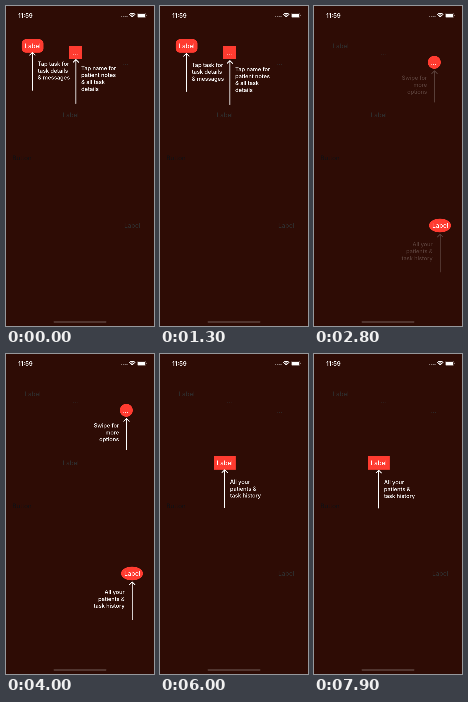
Animation, 148 px wide and 320 px high, one loop 8 s. Source, as an HTML page with a canvas:

```html
<!DOCTYPE html>
<html lang="en">
<head>
<meta charset="utf-8">
<title>Spotlight tour</title>
<style>
  html, body { margin: 0; width: 100%; height: 100%; overflow: hidden; background: #2e0c05; }
  canvas { display: block; width: 148px; height: 320px; }
</style>
</head>
<body>
<canvas id="stage"></canvas>
<script>
const W = 148, H = 320, LOOP = 8000;
const FONT = 'Inter, "Liberation Sans", sans-serif';
const RED = '#ff3b30', DIM_RED = '#ff431c';
const BOB = 2, BOB_HALF = 800, FADE_IN = 500, FADE_OUT = 300, LINE = 6.9;

// Oversampled so that small type keeps its proportions.
const scale = 4 * (window.devicePixelRatio || 1);
const canvas = document.getElementById('stage');
const ctx = canvas.getContext('2d');
canvas.width = W * scale;
canvas.height = H * scale;

// Holes trace a path; tips are placed at the lowest point of the bob.
const rect = (x, y, w, h, r = 0) => () => ctx.roundRect(x, y, w, h, r);
const oval = (x, y, rx, ry) => () => ctx.ellipse(x, y, rx, ry, 0, 0, Math.PI * 2);

const steps = [
  {
    start: -2100, end: 2350,
    holes: [rect(15.7, 33.2, 21.8, 13.5, 4.4), rect(63, 40, 13, 13)],
    tips: [
      { x: 26.4, top: 47.8, bottom: 85.6, tx: 31.8, ty: 59.2, lines: ['Tap task for', 'task details', '& messages'] },
      { x: 69.9, top: 54.9, bottom: 98.9, tx: 75.2, ty: 63.6, lines: ['Tap name for', 'patient notes', '& all task', 'details'] }
    ]
  },
  {
    start: 2650, end: 4950,
    holes: [oval(120.3, 56.3, 6.5, 6.5), oval(126, 219.5, 11, 6.9)],
    tips: [
      { x: 120.5, top: 65, bottom: 96.2, tx: 113, ty: 72, align: 'right', lines: ['Swipe for', 'more', 'options'] },
      { x: 126.2, top: 228.4, bottom: 266.2, tx: 118.6, ty: 238.5, align: 'right', lines: ['All your', 'patients &', 'task history'] }
    ]
  },
  {
    start: 5250, end: LOOP,
    holes: [rect(53.9, 102.2, 21.8, 13.5)],
    tips: [
      { x: 64.7, top: 117.8, bottom: 155.6, tx: 70, ty: 129.8, lines: ['All your', 'patients &', 'task history'] }
    ]
  }
];

const clamp = v => Math.min(1, Math.max(0, v));
const ease = v => (1 - Math.cos(Math.PI * clamp(v))) / 2;

function text(str, x, y, size, weight = 400, align = 'left') {
  ctx.font = `${weight} ${size}px ${FONT}`;
  ctx.textAlign = align;
  ctx.textBaseline = 'alphabetic';
  ctx.fillText(str, x, y + size * 0.36);
}

function page(background) {
  ctx.fillStyle = background;
  ctx.fillRect(0, 0, W, H);
  const label = (str, x, y) => text(str, x, y, 6.25, 400, 'center');
  ctx.fillStyle = '#fff';
  label('Label', 26.6, 40);
  label('Label', 64.7, 109);
  label('Label', 126.2, 219.6);
  label('...', 69.4, 47);
  label('...', 119.6, 56.6);
  ctx.fillStyle = '#40607a';
  label('Button', 16, 152);
}

function spotlight(holes, alpha) {
  ctx.save();
  ctx.beginPath();
  for (const hole of holes) {
    ctx.closePath();
    hole();
  }
  ctx.clip();
  ctx.globalAlpha = alpha;
  page(RED);
  ctx.restore();
}

function tooltip(tip, dy, alpha) {
  ctx.save();
  ctx.globalAlpha = alpha;
  ctx.translate(0, dy);
  ctx.strokeStyle = ctx.fillStyle = '#fff';
  ctx.lineWidth = 0.9;
  ctx.lineCap = ctx.lineJoin = 'round';
  ctx.beginPath();
  ctx.moveTo(tip.x, tip.bottom);
  ctx.lineTo(tip.x, tip.top);
  ctx.moveTo(tip.x - 2.7, tip.top + 2.7);
  ctx.lineTo(tip.x, tip.top);
  ctx.lineTo(tip.x + 2.7, tip.top + 2.7);
  ctx.stroke();
  tip.lines.forEach((line, i) => text(line, tip.tx, tip.ty + i * LINE, 5.55, 500, tip.align));
  ctx.restore();
}

function statusBar() {
  ctx.fillStyle = ctx.strokeStyle = '#fff';
  text('11:59', 12.2, 9.6, 6, 600);

  ctx.globalAlpha = 0.45;
  for (let i = 0; i < 4; i++) ctx.fillRect(115 + i * 1.8, 10, 1.2, 1.2);
  ctx.globalAlpha = 1;

  ctx.lineWidth = 0.9;
  for (const r of [1.2, 2.7, 4.2]) {
    ctx.beginPath();
    ctx.arc(126.3, 11.6, r, -Math.PI * 0.75, -Math.PI * 0.25);
    ctx.stroke();
  }

  ctx.globalAlpha = 0.5;
  ctx.lineWidth = 0.4;
  ctx.beginPath();
  ctx.roundRect(131.4, 7.2, 8.4, 4.4, 1.2);
  ctx.stroke();
  ctx.fillRect(140.2, 8.7, 0.5, 1.4);
  ctx.globalAlpha = 1;
  ctx.beginPath();
  ctx.roundRect(132.1, 7.9, 7, 3, 0.7);
  ctx.fill();
}

function homeBar() {
  ctx.fillStyle = 'rgba(255, 255, 255, 0.17)';
  ctx.beginPath();
  ctx.roundRect(47.5, 315, 53, 1.9, 0.95);
  ctx.fill();
}

function draw(t) {
  ctx.setTransform(scale, 0, 0, scale, 0, 0);
  page(DIM_RED);
  ctx.fillStyle = 'rgba(0, 0, 0, 0.82)';
  ctx.fillRect(0, 0, W, H);

  for (const { start, end, holes, tips } of steps) {
    const out = 1 - ease((t - end) / FADE_OUT);
    const lit = ease((t - start + FADE_OUT) / FADE_OUT) * out;
    if (lit > 0) spotlight(holes, lit);

    const shown = ease((t - start) / FADE_IN) * out;
    const dy = -BOB * (1 - Math.cos(Math.PI * (t - start) / BOB_HALF)) / 2;
    if (shown > 0) tips.forEach(tip => tooltip(tip, dy, shown));
  }

  statusBar();
  homeBar();
}

const began = performance.now();
function tick() {
  draw((performance.now() - began) % LOOP);
  requestAnimationFrame(tick);
}
tick();
</script>
</body>
</html>
```
